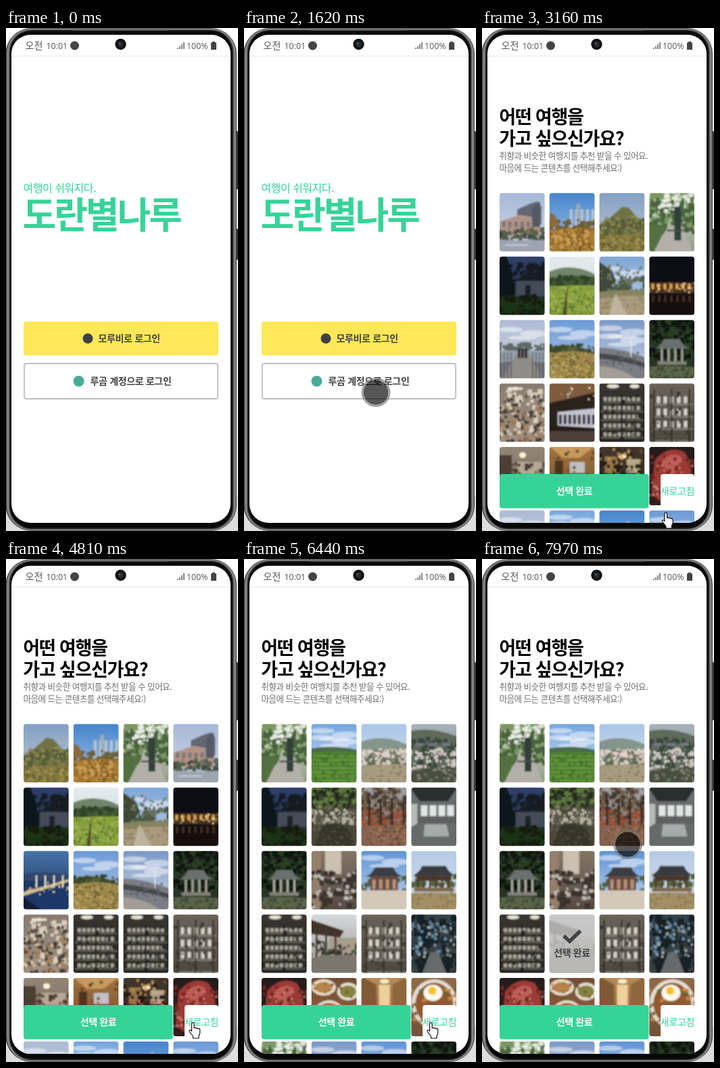
Recreate the animation shown at these times as an HTML page. Size 343 by 742 pixels, loop 8 s.

```html
<!DOCTYPE html>
<html lang="ko">
<head>
<meta charset="utf-8">
<style>
  html, body { margin: 0; width: 100%; height: 100%; overflow: hidden; background: #fff; }
  svg { display: block; width: 100%; height: 100%; }
  text { font-family: "Noto Sans CJK KR", "Noto Sans CJK", sans-serif; }
  .bar { font: 12.4px "Open Sans", "Noto Sans", sans-serif; fill: #555; }
  .label { font-size: 14px; font-weight: 700; letter-spacing: -.35px; fill: #444; }
  .title { font-size: 27px; font-weight: 700; letter-spacing: -1.25px; }
  .note { font-size: 12.6px; letter-spacing: -.55px; fill: #6f6f6f; }
  .mid { text-anchor: middle; }
</style>
</head>
<body>
<svg viewBox="0 0 343 742">
  <defs>
    <clipPath id="screen"><rect x="8" y="10" width="324" height="720" rx="28"/></clipPath>
    <clipPath id="tile"><rect width="66.6" height="86" rx="3.5"/></clipPath>
    <filter id="soft" x="0" y="0" width="1" height="1"><feGaussianBlur stdDeviation="1.1"/></filter>
    <g id="scenes"></g>
  </defs>

  <!-- phone -->
  <path d="M0 690V742H343V690z" fill="#ddd"/>
  <g fill="#333">
    <rect x="338" y="152" width="5" height="86" rx="1.5"/>
    <rect x="338" y="296" width="5" height="46" rx="1.5"/>
  </g>
  <rect x="-.5" width="341.5" height="742" rx="38" fill="#4a4a4a"/>
  <rect x="1.5" y="1" width="338" height="740" rx="36" fill="#8f8f8f"/>
  <rect x="3.5" y="2" width="334" height="738" rx="34" fill="#6a6a6a"/>
  <rect x="5" y="3" width="331" height="736" rx="33" fill="#262626"/>
  <rect x="6.5" y="4.5" width="328" height="733" rx="31" fill="#080808"/>
  <rect x="98" y="2" width="143" height="2" rx="1" fill="#555"/>
  <rect x="8" y="10" width="324" height="720" rx="28" fill="#fff"/>

  <!-- status bar -->
  <text x="28.5" y="31" font-size="14" fill="#555" font-weight="300">오전</text>
  <text x="59.5" y="31" class="bar">10:01</text>
  <circle cx="101.5" cy="26" r="6.5" fill="#444"/>
  <path d="M254 31v-2M257 31v-4M260 31v-7M263 31v-10" stroke="#555" stroke-width="1.4"/>
  <text x="267" y="31" class="bar">100%</text>
  <path d="M303 21.5h2v-1.5h4v1.5h2V32h-8z" fill="#444"/>
  <path d="M8 41.5H332" stroke="#e8e8e8"/>
  <circle cx="169.5" cy="24" r="8.2" fill="#111"/>
  <circle cx="169.5" cy="24" r="4" fill="#272c33"/>
  <circle cx="168" cy="22.5" r="1.2" fill="#5b6470"/>

  <g id="login">
    <text x="25.5" y="242" font-size="16" letter-spacing="-.5" fill="#36d399">여행이 쉬워지다.</text>
    <text x="24.5" y="295.5" font-size="54" font-weight="700" letter-spacing="-3" fill="#36d399">도란별나루</text>
    <rect x="26" y="433" width="288" height="50" rx="4" fill="#fee859"/>
    <circle cx="121" cy="458" r="7.5" fill="#3f4046"/>
    <text x="136.5" y="463" class="label">모루비로 로그인</text>
    <rect x="27" y="495" width="286" height="52" rx="3" fill="#fff" stroke="#bfbfbf" stroke-width="1.8"/>
    <circle cx="107.5" cy="521" r="8" fill="#48ab98"/>
    <text x="124.5" y="526" class="label">루곰 계정으로 로그인</text>
  </g>

  <g id="picker" clip-path="url(#screen)">
    <text x="25.3" y="140.5" class="title">어떤 여행을</text>
    <text x="25.3" y="172.5" class="title">가고 싶으신가요?</text>
    <text x="25.5" y="192.5" class="note">취향과 비슷한 여행지를 추천 받을 수 있어요.</text>
    <text x="25.5" y="210.5" class="note">마음에 드는 콘텐츠를 선택해주세요:)</text>
    <g id="tiles"></g>
    <g id="picked">
      <rect x="99.8" y="524.4" width="66.6" height="86" rx="3.5" fill="#c6c6c6" opacity=".82"/>
      <path d="M121 556l8.5 8L145.5 548.5" fill="none" stroke="#444" stroke-width="5.5"/>
      <text x="133" y="586" class="label mid">선택 완료</text>
    </g>
    <rect x="26" y="658" width="220.5" height="50.5" rx="4" fill="#36d399"/>
    <text x="136.5" y="688" class="label mid" style="fill:#fff">선택 완료</text>
    <rect x="264" y="658" width="50" height="50" rx="4" fill="#fff"/>
    <text x="263.8" y="688" font-size="14" font-weight="500" letter-spacing="-.3" fill="#36d399">새로고침</text>
  </g>

  <circle id="click" r="15" fill="#ff0" opacity=".45"/>
  <g id="dot">
    <circle r="18.5" fill="#000" opacity=".66"/>
    <circle r="20" fill="none" stroke="#777" stroke-width="3" opacity=".65"/>
  </g>
  <path id="hand" fill="#fff" stroke="#111" stroke-width="1.2" stroke-linejoin="round"
    d="M-2 13V2.2a1.8 1.8 0 0 1 3.6 0V8.5a1.7 1.7 0 0 1 3 .4a1.7 1.7 0 0 1 2.9 .6a1.6 1.6 0 0 1 2.7 1.1V16L8.5 20V23.5H0V20.5L-5.5 13.5a1.6 1.6 0 0 1 2.5-1.8z"/>
</svg>

<script>
const $ = id => document.getElementById(id);
const LOOP = 8000;

// Shape helpers; every scene is 67 x 86 units
let seed = 7;
const rnd = () => (seed = (seed * 16807) % 2147483647) / 2147483647;
const P = (c, d) => `<path fill="${c}" d="${d}"/>`;
const R = (c, x, y, w, h) => P(c, `M${x} ${y}h${w}v${h}h${-w}z`);
const E = (c, x, y, rx, ry = rx) => `<ellipse fill="${c}" cx="${x}" cy="${y}" rx="${rx}" ry="${ry}"/>`;
const hill = (c, a, b, z) => P(c, `M-6 ${a}H0Q33 ${b} 67 ${z}H73V92H-6z`);
// Each speck pairs with a darker or lighter neighbour through the blur
const dots = (c, n, y0, y1, s = 3) => {
  let d = '';
  while (n--) {
    const w = (s * (.5 + rnd() * .8)).toFixed(1);
    d += `M${(rnd() * 74 - 6).toFixed(1)} ${(y0 + rnd() * (y1 - y0)).toFixed(1)}h${w}v${w}h-${w}z`;
  }
  return P(c, d);
};
const grid = (c, x, y, w, h, dx, nx, dy = 0, ny = 1) => {
  let d = '';
  for (let i = 0; i < nx * ny; i++) d += `M${x + i % nx * dx} ${y + Math.floor(i / nx) * dy}h${w}v${h}h${-w}z`;
  return P(c, d);
};
const clouds = y => `<g opacity=".5">${E('#fff', 16, y, 18, 4)}${E('#fff', 50, y + 6, 20, 5)}${E('#fff', 34, y + 12, 22, 3)}</g>`;
const roof = (c, y, m) => P(c, `M${m} ${y + 14}Q${m + 10} ${y + 10} ${m + 14} ${y}H${53 - m}Q${57 - m} ${y + 10} ${67 - m} ${y + 14}z`);

const scene = (key, top, bottom, ...shapes) => `<linearGradient id="g${key}" x2="0" y2="1">
  <stop stop-color="${top}"/><stop offset="1" stop-color="${bottom}"/></linearGradient>
  <g id="s${key}" filter="url(#soft)"><rect x="-6" y="-6" width="79" height="98" fill="url(#g${key})"/>${shapes.join('')}</g>`;

$('scenes').innerHTML = [
  scene('A', '#a3b6d6', '#d5dce8', P('#626875', 'M26 24L44 16 56 12 62 20V46H26z'), P('#b29487', 'M0 42L30 32 60 38V64H0z'),
    P('#555a66', 'M48 22L60 12V50H48z'), grid('#7d7478', 4, 42, 5, 8, 9, 5), dots('#56604f', 70, 50, 66, 5), dots('#3f4a40', 30, 54, 68, 4),
    hill('#9ea5b0', 69, 70, 69), R('#d4d9e0', 8, 76, 34, 1.5)),
  scene('B', '#3f80ca', '#b0cdea', grid('#b9c5d0', 30, 24, 4, 32, 8, 5), R('#a2afba', 40, 16, 5, 40), dots('#6d6138', 60, 38, 54, 6),
    P('#8b6a3a', 'M0 30Q10 28 14 50H0z'), hill('#a97c36', 54, 50, 52), dots('#cda356', 110, 54, 86), dots('#7f5a26', 90, 50, 88)),
  scene('C', '#7f9dc4', '#c9cfd0', P('#6f7244', 'M-6 50L16 36 34 20 44 22 56 36 73 42V92H-6z'), dots('#555c36', 80, 36, 64, 5), dots('#868351', 50, 32, 60, 4),
    hill('#83783f', 64, 58, 62), dots('#a3944e', 60, 62, 88), dots('#5f5a30', 40, 62, 88)),
  scene('D', '#dfe6da', '#8d9680', dots('#7c9863', 110, -4, 46, 7), dots('#48643c', 110, 6, 54, 6), dots('#e8eee4', 30, 0, 24, 5),
    P('#b3b0aa', 'M28 48H48L67 92H4z'), P('#55703f', 'M-6 46L26 48 4 92H-6z'), R('#333f3a', 37, 20, 10, 50), R('#454f4a', 26, 54, 34, 2.5)),
  scene('E', '#30426c', '#202a3c', dots('#121a20', 80, 8, 46, 9), R('#454c58', 24, 36, 43, 22), R('#1d232c', 38, 42, 8, 16),
    P('#10171a', 'M-6-6H8L18 20 22 58H-6z'), hill('#1d3019', 58, 57, 60), dots('#131d10', 60, 54, 88, 6)),
  scene('F', '#e4ebf0', '#cfdbd0', hill('#71856a', 22, 8, 26), hill('#435a35', 32, 26, 30), dots('#2f4227', 40, 26, 42, 5), hill('#88a03c', 44, 42, 42),
    dots('#a7b855', 90, 44, 86), dots('#627d30', 90, 44, 88), P('#54502f', 'M27 42L25 92H18z')),
  scene('G', '#7ba3d4', '#c3d3e4', clouds(18), dots('#4c5a42', 70, 28, 50, 6), P('#3f4a37', 'M-6 4L18 20 24 34 10 56H-6z'), dots('#6c7660', 50, 10, 50, 4),
    hill('#86835f', 52, 48, 50), hill('#a89a7c', 62, 56, 58), dots('#8a7f60', 50, 54, 88), P('#bdb39e', 'M24 54L44 92H12z')),
  scene('H', '#0d0e18', '#14110f', R('#4a301c', -6, 38, 79, 16), grid('#e2a655', 3, 40, 4, 8, 9, 7), dots('#ffe0a0', 30, 36, 52, 2),
    grid('#4a301b', 4, 57, 3, 10, 9, 7)),
  scene('I', '#a9b8d2', '#d6dbe3', clouds(14), dots('#626b68', 80, 32, 44, 5), R('#94a0ad', -6, 45, 79, 16), hill('#77767a', 62, 60, 62),
    P('#8f8b87', 'M28 44H40L67 92H0z'), grid('#54535a', -4, 48, 1.5, 44, 5, 5), grid('#54535a', 48, 48, 1.5, 44, 5, 5), grid('#2e2f37', 27, 42, 4, 14, 5, 3)),
  scene('J', '#6797d6', '#bdd0e6', clouds(14), hill('#545f3b', 40, 30, 48), dots('#39452c', 40, 34, 48, 5), hill('#9c8648', 50, 42, 50),
    dots('#bba562', 90, 48, 86), dots('#6c6433', 80, 46, 88)),
  scene('K', '#7695c6', '#d3dbe6', clouds(12), clouds(24), P('#7b7d83', 'M-6 40Q40 42 73 58V92H-6z'), P('#45474e', 'M-6 48Q40 52 73 66V72Q38 60-6 56z'),
    dots('#5b5c60', 40, 46, 76, 3), P('#a29e97', 'M-6 68Q34 68 60 92H-6z'), R('#e9edf1', 46, 28, 1.5, 26)),
  scene('L', '#1b251b', '#30392a', dots('#2c3f28', 100, -4, 54, 6), dots('#10170f', 90, -4, 56, 6), roof('#6b706e', 28, 8),
    grid('#a9a99e', 17, 42, 3, 20, 10, 4), R('#808078', 12, 61, 43, 5), hill('#5c654a', 69, 66, 70), dots('#39452f', 40, 68, 88, 4)),
  scene('M', '#857a6e', '#a39484', dots('#dccfbd', 70, 4, 74, 6), dots('#473d35', 80, 16, 84, 5), dots('#a1805f', 40, 30, 84, 5), R('#f1eadc', 12, 6, 22, 3)),
  scene('N', '#32261f', '#221d1b', P('#7d5c3c', 'M-6-6H73V12L-6 30z'), P('#c4c4cf', 'M12 42L73 36V66L12 62z'), grid('#35323a', 14, 46, 4, 14, 7, 8),
    R('#4d4037', -6, 70, 79, 20), dots('#fff4d5', 10, 4, 24, 2)),
  scene('O', '#3a3732', '#262420', E('#e6e1d4', 20, 4, 9, 3), E('#e6e1d4', 52, 4, 7, 3), grid('#69655d', 2, 27, 63, 2, 0, 1, 13, 5),
    grid('#aaa69b', 6, 20, 5, 6, 7, 8, 13, 5), dots('#2a2824', 40, 14, 86, 4), R('#191816', 32, 16, 2, 74)),
  scene('P', '#6b655b', '#4d473f', grid('#8f897d', 6, 30, 58, 2, 0, 1, 18, 4), grid('#d8d5cd', 11, 19, 5, 10, 10, 5, 18, 3),
    grid('#2f2b27', 6, 8, 2, 82, 26, 3), dots('#39342e', 40, 8, 88, 4)),
  scene('Q', '#96897a', '#6b5c4d', R('#4b3f35', -6, 12, 24, 80), E('#fff4d6', 34, 12, 5, 4), R('#b5a995', 26, 22, 36, 18), dots('#4b3c30', 50, 20, 84, 5)),
  scene('R', '#a8763f', '#65472c', P('#c79a5e', 'M-6-6H73L44 16H20z'), R('#4c341f', 8, 20, 12, 40), R('#bfc1c4', 30, 22, 22, 16), grid('#543820', 0, 40, 8, 40, 13, 5), dots('#6b4a2b', 30, 4, 80, 4)),
  scene('S', '#44382c', '#2b241d', R('#98754a', 8, 14, 18, 26), R('#b8a98a', 40, 18, 20, 20), E('#fff0be', 34, 14, 6, 3), dots('#d1a362', 26, 2, 40, 3), dots('#221b16', 60, 0, 60, 5)),
  scene('T', '#231d1a', '#33201c', P('#9c3a36', 'M8 20Q28-4 52 8 70 34 54 66 30 96 4 70z'), P('#bd5d55', 'M18 22Q34 4 48 16L34 46z'),
    dots('#cf9088', 34, 14, 74, 2.5), dots('#74251f', 34, 10, 78, 4)),
  scene('U', '#4b78b0', '#152748', hill('#33476c', 34, 28, 36), hill('#1c3767', 44, 44, 44), P('#cbbd93', 'M-6 62L73 40V43L-6 68z'),
    grid('#e9e6cc', 18, 36, 2, 18, 13, 4), dots('#ffd98a', 24, 44, 64, 2), P('#121d30', 'M-6 64L34 92H-6z')),
  scene('V', '#6ea2dc', '#dce7f1', clouds(10), clouds(20), hill('#4d6a48', 36, 30, 38), hill('#4f8331', 42, 40, 42),
    grid('#6c9d43', -6, 46, 79, 2, 0, 1, 6, 7), dots('#3d6b28', 80, 42, 88)),
  scene('W', '#a8c4e6', '#dfe4ea', hill('#84958c', 26, 14, 30), hill('#5d6d52', 40, 36, 38), dots('#ddd2ca', 110, 36, 58, 4), dots('#786c5c', 50, 38, 62, 3),
    hill('#a79b80', 62, 58, 60), dots('#857c62', 40, 60, 88)),
  scene('X', '#a9b6be', '#7d8479', hill('#5e6b5c', 10, 4, 18), dots('#39463a', 80, 18, 62, 6), dots('#cfc6c1', 90, 34, 66, 4),
    grid('#767c87', 6, 28, 12, 4, 20, 3), hill('#4a503f', 68, 62, 64), dots('#8c8a7c', 40, 62, 88)),
  scene('Y', '#3a4630', '#4d4739', dots('#627a40', 80, -4, 28, 5), dots('#212a1c', 50, -4, 30, 5), dots('#b8b2a3', 120, 28, 54, 4), dots('#5f5748', 70, 28, 62, 4),
    P('#37342b', 'M4 92Q8 52 34 52 60 52 64 92z'), dots('#56503f', 40, 54, 88)),
  scene('Z', '#a3a8ad', '#765747', dots('#6f5a45', 110, -4, 50, 6), dots('#453c30', 80, -4, 56, 5), dots('#9a4f34', 50, 30, 54, 5),
    grid('#302822', 10, 16, 3, 40, 17, 4), hill('#85624e', 58, 54, 56), dots('#a5795d', 60, 56, 88), dots('#5f4537', 50, 56, 88)),
  scene('a', '#73787a', '#4a4e4d', P('#2b2e2d', 'M-6-6H73L54 20H12z'), grid('#dfe6e4', 14, 26, 10, 16, 13, 4), R('#b4bab8', -6, 24, 15, 34),
    P('#666b69', 'M10 52H73V92H-6V62z'), P('#a5adab', 'M20 54H52L56 72H18z')),
  scene('b', '#85786a', '#54483f', R('#cbc0b2', 20, -2, 24, 36), P('#94806b', 'M-6-6H14V92H-6z'), dots('#3b322c', 60, 26, 86, 7), dots('#bdb8b2', 30, 30, 84, 5)),
  scene('c', '#5b8fd2', '#c9dcf0', clouds(10), dots('#52613c', 24, 36, 56, 6), roof('#3a3c42', 24, 6), R('#6a4738', 13, 38, 41, 20), grid('#b29480', 16, 42, 5, 14, 10, 4),
    hill('#d3c9ba', 58, 58, 58)),
  scene('d', '#b4c9e6', '#d9e0e8', dots('#53633f', 60, 30, 48, 6), roof('#383b42', 22, 2), grid('#523b2a', 8, 36, 3, 22, 9, 6), R('#4a392c', 8, 36, 51, 8),
    R('#7c6850', 4, 54, 59, 6), hill('#a28f64', 62, 60, 62), dots('#8a7a50', 50, 60, 88)),
  scene('e', '#d8dde2', '#958d83', P('#40342b', 'M-6 6L48 24 42 34-6 28z'), R('#a99d8e', 26, 34, 47, 24), grid('#44362b', 6, 22, 3, 46, 14, 3),
    dots('#4c5641', 30, 40, 60, 5), dots('#3a332d', 30, 34, 66, 5), hill('#7d766e', 64, 58, 60)),
  scene('f', '#34434b', '#3a4040', dots('#182125', 90, -4, 84, 8), dots('#6387a0', 40, 8, 56, 4), dots('#a3aeb0', 34, 14, 66, 3), P('#666a6b', 'M28 56H40L54 92H14z')),
  scene('g', '#6f4d33', '#966b42', E('#e6dac6', 18, 14, 18, 12), E('#b98446', 18, 14, 13, 8), E('#e6dfd2', 54, 20, 16, 13),
    E('#84833f', 54, 20, 12, 9), E('#e6dac6', 26, 48, 20, 15), E('#a8662f', 26, 48, 16, 11), dots('#7a5228', 40, 6, 56, 3)),
  scene('h', '#bd9058', '#735232', R('#ecd19a', 26, 10, 16, 34), P('#805a36', 'M-6-6L22 10V60L-6 92z'), P('#8e683d', 'M73-6L46 10V60L73 92z'), E('#fff1c9', 34, 5, 7, 3)),
  scene('i', '#8f6d4b', '#6f5036', E('#e4ddd0', 34, 38, 34, 36), E('#93582f', 34, 38, 28, 31), dots('#56692f', 26, 14, 64, 5),
    dots('#c58344', 26, 14, 64, 5), E('#fbf7ea', 32, 22, 14, 12), E('#f5c22c', 31, 19, 6)),
].join('');

// Tile sets: four pictures per row, six rows
const SETS = [
  'ABCDEFGHIJKLMNOPQRSTIVBJ',
  'CBDAEFGHUJKLMOOPQRSTIVBJ',
  'CVDAEYGaUJcLMOePQgSTIVcJ',
  'DVWXEYZaLbcdOePfTghiDKcL',
];
const starts = i => [2790 + i * 15, 4810, 4840 + i % 4 * 33, 6290 + i * 3 % 5 * 37];

const tiles = [...SETS[0]].map((_, i) => {
  const use = document.createElementNS('http://www.w3.org/2000/svg', 'use');
  const g = document.createElementNS('http://www.w3.org/2000/svg', 'g');
  g.setAttribute('transform', `translate(${26 + i % 4 * 73.8} ${243.5 + Math.floor(i / 4) * 93.65})`);
  g.setAttribute('clip-path', 'url(#tile)');
  g.append(use);
  $('tiles').append(g);
  return use;
});

// Pointer stops: time, x, y, linear
const STOPS = [
  [250, 242, 760], [910, 195, 537.5], [2510, 195, 537.5], [2800, 255.5, 722.5],
  [3160, 272, 714.5], [3310, 269.5, 691], [3390, 269.5, 691], [3500, 269.5, 683.5],
  [3680, 269.5, 683.5], [3880, 276.5, 683.5], [6820, 276.5, 683.5], [7200, 133, 567],
  [7330, 133, 567], [7610, 180, 506, 1], [7970, 215.5, 421, 1],
];
const CLICKS = [[1100, 1180], [3900, 3990], [5450, 5550], [7220, 7300]];

function pointer(t) {
  const n = STOPS.findIndex(s => s[0] > t);
  if (n < 0) return STOPS.at(-1).slice(1, 3);
  if (n === 0) return STOPS[0].slice(1, 3);
  const [t0, x0, y0] = STOPS[n - 1], [t1, x1, y1, linear] = STOPS[n];
  const u = (t - t0) / (t1 - t0);
  const k = linear ? u : u * u * (3 - 2 * u);
  return [x0 + (x1 - x0) * k, y0 + (y1 - y0) * k];
}

const show = (el, on) => el.style.display = on ? '' : 'none';

function draw(t) {
  show($('login'), t < 1940);
  show($('picker'), t >= 1940);
  show($('picked'), t >= 7300);
  tiles.forEach((use, i) => {
    const n = starts(i).filter(s => t >= s).length;
    const ref = n ? '#s' + SETS[n - 1][i] : '';
    show(use, n);
    if (n && use.getAttribute('href') !== ref) use.setAttribute('href', ref);
  });
  const hand = t >= 2790 && t < 6850;
  show($('hand'), hand);
  show($('dot'), t >= 250 && !hand);
  show($('click'), CLICKS.some(([a, b]) => t >= a && t < b));
  const at = `translate(${pointer(t).map(v => v.toFixed(2)).join(' ')})`;
  for (const id of ['hand', 'dot', 'click']) $(id).setAttribute('transform', at);
}

const begin = performance.now();
function frame() {
  draw((performance.now() - begin) % LOOP);
  requestAnimationFrame(frame);
}
frame();
</script>
</body>
</html>
```
